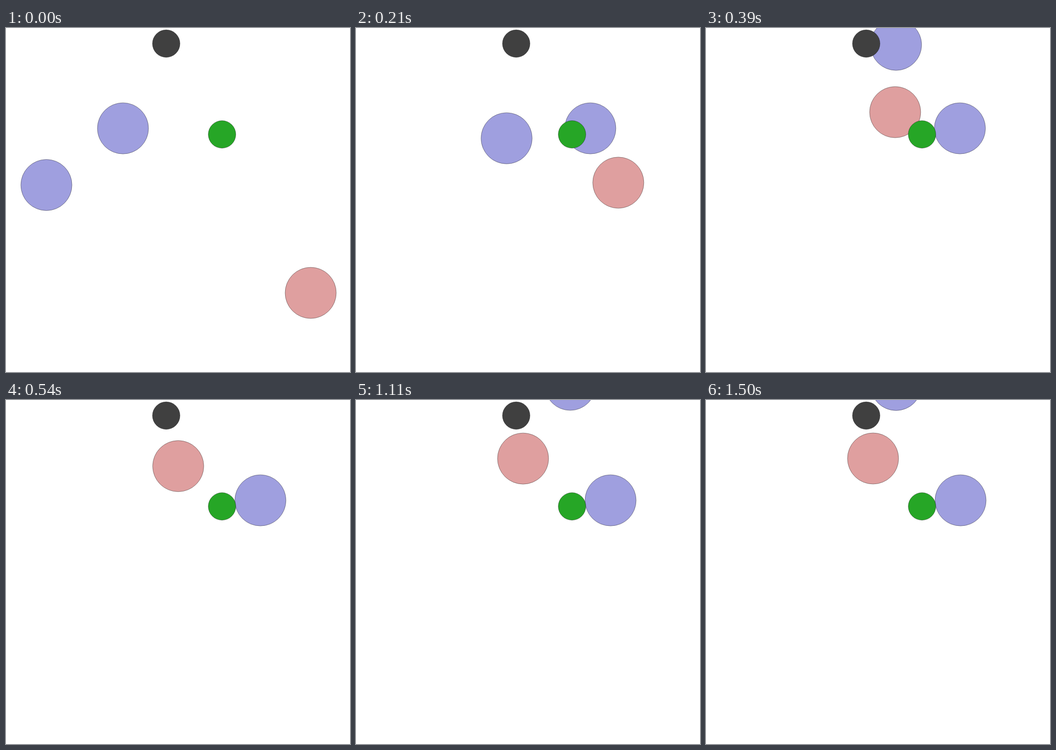
Animation, 700 px wide and 700 px high, one loop 1530 ms. Source, as an HTML page:

```html
<!DOCTYPE html>
<html lang="en">
<head>
<meta charset="utf-8">
<title>Moving discs</title>
<style>
  html, body { margin: 0; width: 100%; height: 100%; overflow: hidden; background: #fff; }
  svg { display: block; width: 100%; height: 100%; }
  circle { stroke: #000; stroke-opacity: .4; stroke-width: 1; }
  .big { fill-opacity: .5; }
  .blue { fill: #4040bf; }
  .red { fill: #bf4040; }
</style>
</head>
<body>
<svg viewBox="0 0 700 700">
  <circle id="red" class="big red" r="52"/>
  <circle id="low" class="big blue" r="52"/>
  <circle id="high" class="big blue" r="52"/>
  <circle cx="326" cy="31.7" r="28" fill="#404040"/>
  <circle cx="439.6" cy="216.5" r="28" fill="#26a626"/>
</svg>
<script>
const STEP = 30, LOOP = 1530, SPEED = 34.12, TURN = 4;
const discs = ['red', 'low', 'high'].map(id => document.getElementById(id));

// Distance still to go: each step covers a share of it, up to a top speed.
function remaining(gap, top, share, steps) {
  for (let i = 0; i < steps; i++) gap -= Math.min(top, share * gap);
  return gap;
}

// Straight up, then diagonally to rest below the dark disc.
function redAt(n) {
  if (n <= TURN) return [620, 539 - SPEED * n];
  return [
    339.9 + remaining(280.1, 28.75, .252, n - TURN),
    119 + remaining(283.5, 29.25, .215, n - TURN)
  ];
}

// Straight right, then up past the edge, where it sways sideways.
function lowAt(n) {
  if (n <= TURN) return [82.2 + SPEED * n, 319.5];
  const m = n - TURN;
  const sway = 411.3 + 27.5 * Math.sin(Math.PI * (n - 25) / 18.5);
  const sink = -30.6 - 4.9 * .8 ** (n - 25);
  return [Math.min(218.7 + 29.25 * m, sway), Math.max(319.5 - 31.7 * m, sink)];
}

// Straight right until it comes to rest beside the green disc.
function highAt(n) {
  return [Math.min(238 + SPEED * n, 518 - 5.7 * .75 ** (n - 8)), 204.2];
}

function draw(time) {
  const n = Math.floor((time % LOOP) / STEP);
  [redAt(n), lowAt(n), highAt(n)].forEach(([x, y], i) => {
    discs[i].setAttribute('cx', x.toFixed(2));
    discs[i].setAttribute('cy', y.toFixed(2));
  });
}

let start;
function tick(now) {
  start ??= now;
  draw(now - start);
  requestAnimationFrame(tick);
}
draw(0);
requestAnimationFrame(tick);
</script>
</body>
</html>
```
